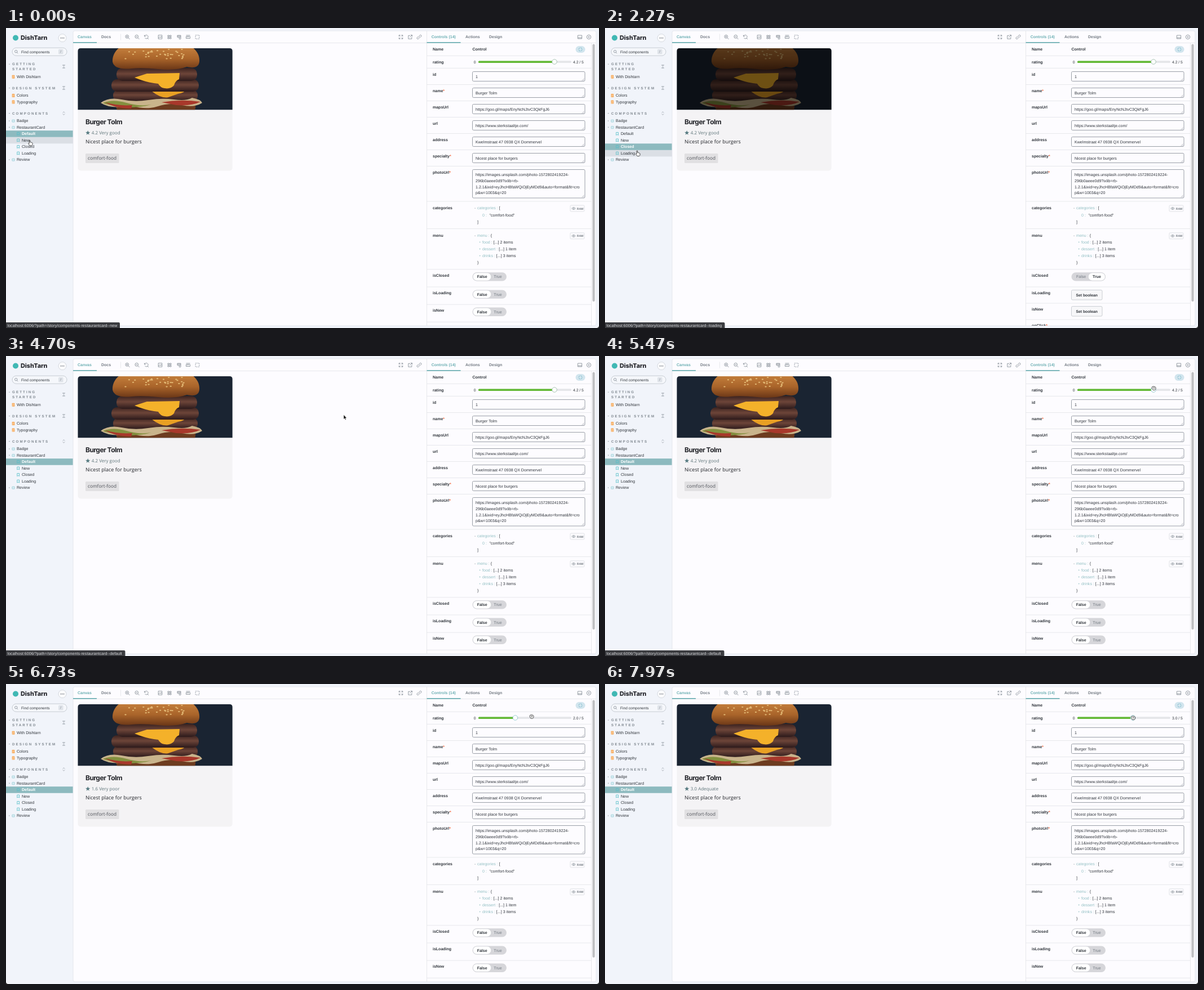
Write an HTML page that moves like this. It is 1052 px wide and 533 px high and loops after 8000 ms.

```html
<!DOCTYPE html>
<html lang="en">
<head>
<meta charset="utf-8">
<title>Component workshop</title>
<style>
html,body{margin:0;width:100%;height:100%;overflow:hidden;background:#f1f4fa}
svg{display:block;width:100%;height:100%}
text{font:7.1px "Liberation Sans",Arial,sans-serif;fill:#30353b;text-rendering:geometricPrecision;white-space:pre}
.b{font-weight:700;font-size:7px}
.head{font-weight:700;font-size:6.2px;letter-spacing:2.1px;fill:#7f878f}
.teal{fill:#6cafb3}.pale{fill:#92bfc3}.grey{fill:#737a82}
.card{font-family:"Open Sans","Noto Sans",sans-serif}
.title{font-family:Inter,sans-serif;font-weight:700;fill:#24252a}
.ic{fill:none;stroke:#858d95;stroke-width:.85}
.line{stroke:#e3e4e8;stroke-width:.8}
.input{fill:#fdfcff;stroke:#9a9fa7;stroke-width:1}
</style>
</head>
<body>
<svg id="stage" viewBox="0 0 1052 533" xmlns="http://www.w3.org/2000/svg"></svg>
<script>
const stories = ['Default', 'New', 'Closed', 'Loading'];
const LOOP = 8000, ROW = 11.55, TREE_TOP = 182.2, DRAG_START = 5500;

const esc = s => s.replace(/&/g, '&amp;');
const text = (x, y, s, cls = '', extra = '') => `<text x="${x}" y="${y}" class="${cls}" ${extra}>${s}</text>`;
const rect = (x, y, w, h, fill, r = 0, extra = '') =>
  `<rect x="${x}" y="${y}" width="${w}" height="${h}" rx="${r}" fill="${fill}" ${extra}/>`;
const path = (d, fill, extra = '') => `<path d="${d}" fill="${fill}" ${extra}/>`;
const circle = (x, y, r, fill, extra = '') => `<circle cx="${x}" cy="${y}" r="${r}" fill="${fill}" ${extra}/>`;
const icon = (x, y, d, extra = '') => `<path class="ic" transform="translate(${x} ${y})" d="${d}" ${extra}/>`;
const hline = y => `<path class="line" d="M746.5 ${y}H1038"/>`;
const group = (id, body, extra = '') => `<g id="${id}" ${extra}>${body}</g>`;

let seed = 7;
const rnd = (a, b) => {
  seed = (seed * 16807) % 2147483647;
  return a + (b - a) * seed / 2147483647;
};

function sidebar() {
  const bookmark = (x, y) => icon(x, y, 'M-1.9 -2.5H1.9V2.5L0 1.2L-1.9 2.5Z', 'style="stroke:#55bfc8"');
  const doc = y => rect(10.7, y - 3, 4.6, 6, '#f6a24a', .6) +
    `<path d="M11.5 ${y - 1.3}h3m-3 1.6h3m-3 1.5h2" stroke="#fff" stroke-width=".6"/>`;
  const folder = y => rect(10.8, y - 2, 4.6, 4.2, '#d5eaf0', .6, 'stroke="#8cc9d4" stroke-width=".6"');
  const caret = (x, y, open) => path(open ? `M${x - 1.3} ${y - .7}h2.6l-1.3 1.6z` : `M${x - .7} ${y - 1.2}v2.4l1.5 -1.2z`, '#a5abb3');
  const section = (y, s) => caret(6, y - 2, true) + text(11, y, s, 'head');
  const collapse = (y, d) => icon(102.5, y, d, 'style="stroke-width:.7"');
  const fold = 'M-2 -2.7L0 -.6L2 -2.7ZM-2 2.7L0 .6L2 2.7Z';
  return circle(17, 17.5, 5, '#3fb8b4') + text(26, 21, 'DishTarn', 'title', 'style="font-size:10.8px;font-weight:800"') +
    circle(100, 17.7, 7, '#fbfcfe', 'stroke="#c7ccd2" stroke-width=".7"') +
    [97.4, 100, 102.6].map(x => circle(x, 17.7, .8, '#4a5058')).join('') +
    rect(11, 35.2, 97, 14, '#f5f7fb', 7, 'stroke="#bcc2c9" stroke-width=".8"') +
    icon(18, 41.7, 'M2 0A2.2 2.2 0 1 1 -2.4 0A2.2 2.2 0 1 1 2 0M1.3 1.6L3.2 3.4') +
    text(27, 44.7, 'Find components', '', 'style="font-size:6.6px"') +
    rect(93, 37.8, 8.5, 8.6, '#dfe3e9', 1.5) + text(96.3, 44.4, '/', 'grey', 'style="font-size:6px"') +
    section(66.4, 'GETTING') + text(11, 75.2, 'STARTED', 'head') + collapse(68.5, fold) +
    doc(86.7) + text(19, 89.1, 'With Dishtarn') +
    section(108.6, 'DESIGN SYSTEM') + collapse(106.5, fold) +
    doc(120) + text(19, 122.4, 'Colors') + doc(131.6) + text(19, 134, 'Typography') +
    section(153.8, 'COMPONENTS') + collapse(151.6, 'M-1.8 -1L0 -2.8L1.8 -1M-1.8 1L0 2.8L1.8 1') +
    [[165, 'Badge'], [176.5, 'RestaurantCard'], [234, 'Review']].map(([y, s], i) =>
      caret(6, y, i === 1) + folder(y) + text(19, y + 2.4, s)).join('') +
    rect(0, 0, 119, ROW, '#dbdfe5', 0, 'id="hover"') + rect(0, 0, 119, ROW, '#8dbabf', 0, 'id="selected"') +
    stories.map((s, i) => {
      const y = TREE_TOP + ROW * (i + .5);
      return bookmark(21.7, y) + text(28, y + 2.4, s, '', `id="item${i}"`);
    }).join('');
}

function toolbar() {
  const lens = 'M2.2 -.7A2.9 2.9 0 1 1 -3.6 -.7A2.9 2.9 0 1 1 2.2 -.7M1.4 1.4L4 4';
  const box = 'M-3.3 -3.3H3.3V3.3H-3.3Z';
  return `<path class="line" d="M119 26.5H1047M203.5 10.5V21.5M746.5 5V529"/>` +
    text(127, 18.4, 'Canvas', 'b teal') + text(169, 18.4, 'Docs', 'b grey') +
    rect(119, 25, 42, 1.7, '#6cafb3') + rect(746.5, 25, 60, 1.7, '#6cafb3') +
    text(754.7, 18.4, 'Controls (14)', 'b teal') + text(815, 18.4, 'Actions', 'b grey') + text(857, 18.4, 'Design', 'b grey') +
    icon(215.5, 16, lens + 'M-2.2 -.7H.8M-.7 -2.2V.8') + icon(232.5, 16, lens + 'M-2.2 -.7H.8') +
    icon(249, 16, 'M-3 -1.5A3.2 3.2 0 1 1 -2.6 1.6M-3.5 -3.5V-1.2H-1.2M2 2L4 4') +
    icon(273.5, 16, box + 'M-3 2L-1 -.5L.5 1L2 -1L3 1') +
    icon(290, 16, 'M-3 -3H-.7V-.7H-3ZM.7 -3H3V-.7H.7ZM-3 .7H-.7V3H-3ZM.7 .7H3V3H.7Z') +
    icon(307, 16, 'M-3 -3H3V.5H-3ZM.2 .5H3V3.5H.2ZM-3 -1.5H3') +
    icon(323, 16, 'M-3.5 -1H3.5V2.5H-3.5ZM-3.5 -3H3.5M-1.5 -1V.6M.5 -1V.6') +
    icon(339.5, 16, box, 'stroke-dasharray="2 1.3"') +
    icon(700.5, 16, 'M-3.3 -1V-3.3H-1M1 -3.3H3.3V-1M3.3 1V3.3H1M-1 3.3H-3.3V1M-3 -3L-1 -1M3 -3L1 -1M3 3L1 1M-3 3L-1 1') +
    icon(717, 16, 'M0 -2.7H-3.2V3.3H2.8V0M.8 -3.5H3.5V-.8M3.4 -3.4L-.6 .6') +
    icon(733, 16, 'M-.5 -1.5L1.2 -3.2A1.6 1.6 0 0 1 3.5 -.9L1.5 1.1M.5 1.5L-1.2 3.2A1.6 1.6 0 0 1 -3.5 .9L-1.5 -1.1M-1.2 1.2L1.2 -1.2') +
    icon(1018, 16, 'M-3.6 -3H3.6V3H-3.6ZM-3.6 1.3H3.6') +
    icon(1034, 16, 'M3.7 0A3.7 3.7 0 1 1 -3.7 0A3.7 3.7 0 1 1 3.7 0M-1.4 -1.4L1.4 1.4M1.4 -1.4L-1.4 1.4');
}

function burger() {
  const patty = (x, y, w, h) => rect(x, y, w, h, 'url(#meat)', h / 2.2);
  const seeds = Array.from({length: 36}, () =>
    `<ellipse cx="${rnd(212, 322)}" cy="${rnd(37, 56)}" rx="1.7" ry="1" fill="#e6bd78"/>`).join('');
  return rect(127, 35, 275, 111, '#1a2432') +
    path('M195 135H336Q338 150 325 155H208Q194 148 195 135Z', '#6d3c20') +
    patty(190, 110, 150, 20) +
    path('M168 133Q182 122 205 127T252 128T298 127T330 124Q346 127 348 133Q334 142 312 137T270 139T222 138Q186 145 168 133Z', '#c9b48c') +
    path('M172 133Q190 126 214 133T258 136Q232 143 206 140T172 133Z', '#83903f') +
    path('M176 132Q200 139 224 137L222 143Q194 143 176 132ZM276 132Q310 126 345 131Q329 139 302 137Z', '#a8382b') +
    path('M258 112L320 108Q318 115 305 117L288 123Q276 126 258 112Z', '#e9a024') +
    patty(187, 91, 155, 22) + patty(196, 71, 143, 23) +
    path('M228 88L250 81L308 80L307 91Q300 94 298 102Q292 109 281 107Q274 106 270 99Q252 98 228 88Z', '#f4b12a') +
    path('M189 60C188 34 218 19 266 19S345 34 343 60C342 69 335 72 321 69Q300 76 270 73T223 72Q192 75 189 60Z', 'url(#bun)') +
    seeds;
}

function card() {
  const star = Array.from({length: 10}, (_, i) => {
    const r = i % 2 ? 1.8 : 4.4, a = (i / 5 - .5) * Math.PI;
    return `${145.2 + r * Math.cos(a)},${186.3 + r * Math.sin(a)}`;
  }).join(' ');
  const bone = (x, y, w, h) => rect(x, y, w, h, 'url(#shimmer)');
  return group('meal', rect(127.5, 36, 274.2, 217.5, '#f4f3f5', 5) +
      `<g clip-path="url(#photo)">${burger()}</g>` +
      rect(127.5, 36, 274.2, 109.2, '#000', 0, 'id="closed" opacity=".55" clip-path="url(#photo)"') +
      group('badge', rect(132, 40.2, 37, 24.3, '#dfe4b4', 4, 'stroke="#f0f2d8" stroke-width=".8"') +
        text(136.8, 57, 'new', 'title', 'style="font-size:13.2px"')) +
      text(141, 171, 'Burger Tolm', 'title', 'style="font-size:12px;letter-spacing:-.55px"') +
      `<polygon points="${star}" fill="#557a80"/>` +
      text(151.8, 189.3, '', 'card', 'id="review" style="font-size:8px;fill:#5f757a"') +
      text(141, 204.6, 'Nicest place for burgers', 'card', 'style="font-size:9px;fill:#222429"') +
      rect(141, 223, 59.5, 17, '#e1e0e2', 1.5) +
      text(145, 234.3, 'comfort-food', 'card', 'style="font-size:8.25px;fill:#50535a"')) +
    group('skeleton', rect(127.5, 37, 274.2, 214.5, '#f5f4f6', 5) +
      bone(127.5, 37, 274.2, 109.5) + bone(141, 161.3, 123.5, 12) + bone(141, 184, 87, 10) +
      bone(141, 200, 248, 10) + bone(141, 226, 62, 12.5));
}

function panel() {
  const label = (y, s, required) => text(757, y, s + (required ? '<tspan fill="#f0643c">*</tspan>' : ''), 'b');
  const grip = y => `<path d="M1021.7 ${y - 1.2}l4 -4m-1.8 4l1.8 -1.8" stroke="#8d939b" stroke-width=".6"/>`;
  const field = (i, name, value, required) => {
    const y = 77.5 + 29 * i;
    return label(y + 7.6, name, required) + rect(827.5, y, 199.5, 17, '', 2, 'class="input"') +
      text(833, y + 11, value) + grip(y + 17.4) + hline(y + 23);
  };
  const raw = y => rect(1001, y - 5.6, 25, 11, '#fbfafd', 1.5, 'stroke="#d6d8dd" stroke-width=".7"') +
    icon(1007, y, 'M-3.3 0Q0 -4 3.3 0Q0 4 -3.3 0M1 0A1 1 0 1 1 -1 0A1 1 0 1 1 1 0', 'style="stroke-width:.7"') +
    text(1012.8, y + 1.9, 'RAW', 'b grey', 'style="font-size:5.1px"');
  const branch = (y, name, rest) => text(845, y, `<tspan fill="#92bfc3">${name} : </tspan>${rest}`) +
    path(`M840 ${y - 3.6}v2.4l1.8 -1.2z`, '#92bfc3');
  const root = (y, name, bracket) => text(831, y, '-', 'grey') +
    text(836, y, `<tspan fill="#92bfc3">${name} : </tspan>${bracket}`);
  const toggle = (y, on) => rect(827.5, y, 60.5, 15.4, '#d6d6da', 7.7) +
    rect(on ? 857.3 : 828.3, y + .7, on ? 30 : 32.4, 14, '#fff', 7, 'stroke="#c3c5ca" stroke-width=".5"') +
    text(844.6, y + 10.2, 'False', on ? 'grey' : 'b', 'text-anchor="middle"') +
    text(872.5, y + 10.2, 'True', on ? 'b' : 'grey', 'text-anchor="middle"');
  const setButton = y => rect(827.5, y, 54.5, 17.4, '#f7f7f9', 2, 'stroke="#bfc3c8" stroke-width=".8"') +
    text(854.7, y + 11.2, 'Set boolean', 'b', 'text-anchor="middle" style="font-size:6.8px"');
  const active = name => {
    const rest = ['isClosed', 'isLoading', 'isNew'].filter(n => n !== name);
    return label(442, name) + toggle(434.2, true) + hline(460) +
      rest.map((n, i) => label(473.2 + 29 * i, n) + setButton(465.6 + 29 * i) + hline(489 + 29 * i)).join('') +
      label(531, 'onClick', true);
  };
  const plain = ['isClosed', 'isLoading', 'isNew'].map((n, i) =>
    label(442 + 31.2 * i, n) + toggle(434.2 + 31.2 * i, false) + hline(460 + 31.2 * i)).join('');
  const photoUrl = ['https://images.unsplash.com/photo-1572802419224-', '296b0aeee0d9?ixlib=rb-',
    '1.2.1&ixid=eyJhcHBfaWQiOjEyMDd9&auto=format&fit=cro', 'p&w=1003&q=20'];
  return label(40.3, 'Name') + text(827.5, 40.3, 'Control', 'b') + hline(49.3) +
    rect(1010.5, 32, 17, 12, '#d2e5ee', 6) +
    icon(1019, 38, 'M3 0A3 3 0 1 1 -3 0A3 3 0 1 1 3 0', 'style="stroke:#77b8c8" stroke-dasharray="3.6 1.1"') +
    label(62.6, 'rating') + text(829.8, 62.8, '0', '', 'style="font-size:6.8px"') +
    rect(838, 58.8, 164.5, 2.8, '#e6e7ea', 1.4, 'stroke="#d0d2d6" stroke-width=".4"') +
    rect(838, 58.5, 100, 3.4, '#62b934', 1.5, 'id="fill"') +
    circle(0, 60, 4.3, '#fff', 'id="thumb" stroke="#94b6a3" stroke-width=".8"') +
    text(1006, 62.8, '', '', 'id="rating" style="font-size:6.8px"') + hline(71.4) +
    field(0, 'id', '1') + field(1, 'name', 'Burger Tolm', true) +
    field(2, 'mapsUrl', 'https://goo.gl/maps/EnyNcNJtvC3QkFgJ6') + field(3, 'url', 'https://www.sterkstaaltje.com/') +
    field(4, 'address', 'Kwelmstraat 47 0938 QX Dommervel') + field(5, 'specialty', 'Nicest place for burgers', true) +
    label(259.4, 'photoUrl', true) + rect(827.5, 251.5, 199.5, 50.5, '', 2, 'class="input"') + grip(302) +
    photoUrl.map((s, i) => text(833, 262.6 + 10.95 * i, esc(s))).join('') + hline(308) +
    label(321.6, 'categories') + root(322.3, 'categories', '[') + raw(320.6) +
    text(845, 334.5, '0 :', 'pale') + text(857.5, 334.5, '"comfort-food"') +
    text(836, 347.2, ']') + hline(356.6) +
    label(370.6, 'menu') + root(371, 'menu', '{') + raw(369.4) +
    branch(382.8, 'food', '[...] 2 items') + branch(394.9, 'dessert', '[...] 1 item') + branch(407, 'drinks', '[...] 3 items') +
    text(836, 419.3, '}') + hline(428.8) +
    group('controls0', plain) + ['isNew', 'isClosed', 'isLoading'].map((n, i) => group('controls' + (i + 1), active(n))).join('') +
    `<path class="line" d="M1038.5 27V529"/>` + rect(1040.4, 28.5, 4.2, 457.5, '#bebfc2', 2.1);
}

function pointers() {
  const skin = 'stroke="#222" stroke-width=".8" stroke-linejoin="round"';
  return group('arrow', path('M0 0V7.8L1.8 6.2L3 9L4.3 8.4L3.1 5.8H5.5Z', '#111', 'stroke="#fff" stroke-width=".5"')) +
    group('hand', path('M-.8 .3Q0 -.6 .8 .3V3.4Q2 2.9 2.6 3.8Q4 3.5 4.3 4.6Q5.2 4.6 5.2 6Q5.2 9 3.7 9.6H.2Q-1.4 7.5 -2.4 5.8Q-2 4.6 -.8 5.6Z', '#fff', skin)) +
    group('fist', path('M-3.2 -1.4Q-3 -3 -1.6 -2.6Q-.4 -3.6 .6 -2.6Q2 -3.2 2.6 -2Q3.8 -1.8 3.6 0Q3.4 3.1 2 3.4H-1.4Q-3.4 1.8 -3.2 -1.4Z', '#fff', skin) +
      `<path d="M-1.4 -.9H2M-.9 .8H1.6" stroke="#333" stroke-width=".7"/>`);
}

const stage = document.getElementById('stage');
stage.innerHTML = `<defs>
  <clipPath id="photo"><path d="M127.5 145.2V41Q127.5 36 132.5 36H396.7Q401.7 36 401.7 41V145.2Z"/></clipPath>
  <clipPath id="frame"><rect x="119" y="5" width="928" height="524" rx="3"/></clipPath>
  <linearGradient id="bun" x2="0" y2="1"><stop offset=".2" stop-color="#c98440"/><stop offset=".65" stop-color="#a9642a"/><stop offset="1" stop-color="#6b3717"/></linearGradient>
  <linearGradient id="meat" x2="0" y2="1"><stop offset="0" stop-color="#3a221f"/><stop offset=".45" stop-color="#6d4539"/><stop offset="1" stop-color="#2c1a1b"/></linearGradient>
  <linearGradient id="shimmer"><stop offset="0" stop-color="#e3e2e4"/><stop offset=".5" stop-color="#f3f2f4"/><stop offset="1" stop-color="#e3e2e4"/></linearGradient>
</defs>` +
  rect(0, 0, 1052, 533, '#f1f4fa') + sidebar() +
  rect(119, 5, 928, 524, '#fdfcff', 3, 'stroke="#e2e5eb" stroke-width=".9"') +
  `<g clip-path="url(#frame)">${toolbar()}${card()}${panel()}</g>` +
  path('M0 533V530Q.5 532.5 3 533ZM1052 533V529Q1051.5 532.5 1048 533Z', '#222') +
  group('status', rect(-2, 523, 10, 12, '#3b3c40', 2, 'id="statusBox"') +
    text(2.5, 530.5, '', '', 'id="statusText" style="font-size:7px;letter-spacing:.07px;fill:#dedfe2"')) +
  group('pointer', pointers());

const ui = Object.fromEntries([...stage.querySelectorAll('[id]')].map(el => [el.id, el]));
const set = (el, attrs) => Object.entries(attrs).forEach(([k, v]) => el.setAttribute(k, v));
const show = (el, on) => { el.style.display = on ? '' : 'none'; };

// time, x, y
const route = [
  [0, 42, 199.5], [450, 42, 199.5], [800, 50, 211], [1230, 51, 211], [1500, 51, 211], [1950, 57, 218],
  [3700, 57, 218], [4100, 44, 188], [4350, 44, 188], [4700, 599, 104.5], [5300, 973, 57], [DRAG_START, 973, 57],
  [6280, 860, 57], [6400, 860, 57], [6900, 958, 58], [7420, 880, 58], [7800, 936.5, 60], [LOOP, 936.5, 60]
];
const picks = [[0, 0], [420, 1], [1450, 2], [2650, 3], [4250, 0]];
const statusWidth = [211.5, 202, 210.5, 212.5];

function pointerAt(t) {
  const i = Math.max(1, route.findIndex(k => k[0] >= t));
  const [t0, x0, y0] = route[i - 1], [t1, x1, y1] = route[i];
  const p = (t - t0) / (t1 - t0), e = p * p * (3 - 2 * p);
  return [x0 + (x1 - x0) * e, y0 + (y1 - y0) * e];
}
const rowAt = y => Math.floor((y - TREE_TOP) / ROW);
const sliderX = t => pointerAt(Math.max(DRAG_START, t))[0];
const valueAt = x => (x - 841.4) / 31.3;
const verdict = v => v < 2 ? 'Very poor' : v <= 3.05 ? 'Adequate' : v < 4 ? 'Good' : 'Very good';

function draw(t) {
  const [x, y] = pointerAt(t);
  const story = picks.filter(p => p[0] <= t).pop()[1];
  const inTree = x < 119, dragging = t >= 5300;

  set(ui.selected, {y: TREE_TOP + ROW * story});
  set(ui.hover, {y: TREE_TOP + ROW * rowAt(y)});
  show(ui.hover, inTree);
  stories.forEach((_, i) => {
    set(ui['item' + i], {style: i === story ? 'fill:#fff;font-weight:700' : ''});
    show(ui['controls' + i], i === story);
  });

  show(ui.meal, story !== 3);
  show(ui.skeleton, story === 3);
  show(ui.badge, story === 1);
  show(ui.closed, story === 2);
  const glow = -.4 + 2.2 * ((t - 2650 + LOOP) % LOOP / 1400 % 1);
  set(ui.shimmer, {x1: glow - .35, x2: glow + .35});

  // The thumb trails the pointer; the card refreshes in coarser beats.
  const thumbX = sliderX(t - 100);
  const cardValue = valueAt(sliderX(Math.floor((t - 163) / 107) * 107 + 63));
  set(ui.thumb, {cx: thumbX, stroke: dragging ? '#80bfc6' : '#94b6a3'});
  set(ui.fill, {width: thumbX - 838});
  ui.rating.textContent = valueAt(thumbX).toFixed(1) + ' / 5';
  ui.review.textContent = cardValue.toFixed(1) + ' ' + verdict(cardValue);

  const linked = rowAt(pointerAt(Math.min(t, 4350))[1]);
  set(ui.statusBox, {width: statusWidth[linked] + 2});
  ui.statusText.textContent = 'localhost:6006/?path=/story/components-restaurantcard--' + stories[linked].toLowerCase();
  ui.status.style.opacity = Math.min(1, Math.max(0, (6000 - t) / 100));

  set(ui.pointer, {transform: `translate(${x + (dragging ? .5 : 0)} ${y})`});
  show(ui.hand, inTree);
  show(ui.fist, dragging);
  show(ui.arrow, !inTree && !dragging);
}

function tick() {
  draw(performance.now() % LOOP);
  requestAnimationFrame(tick);
}
tick();
</script>
</body>
</html>
```
